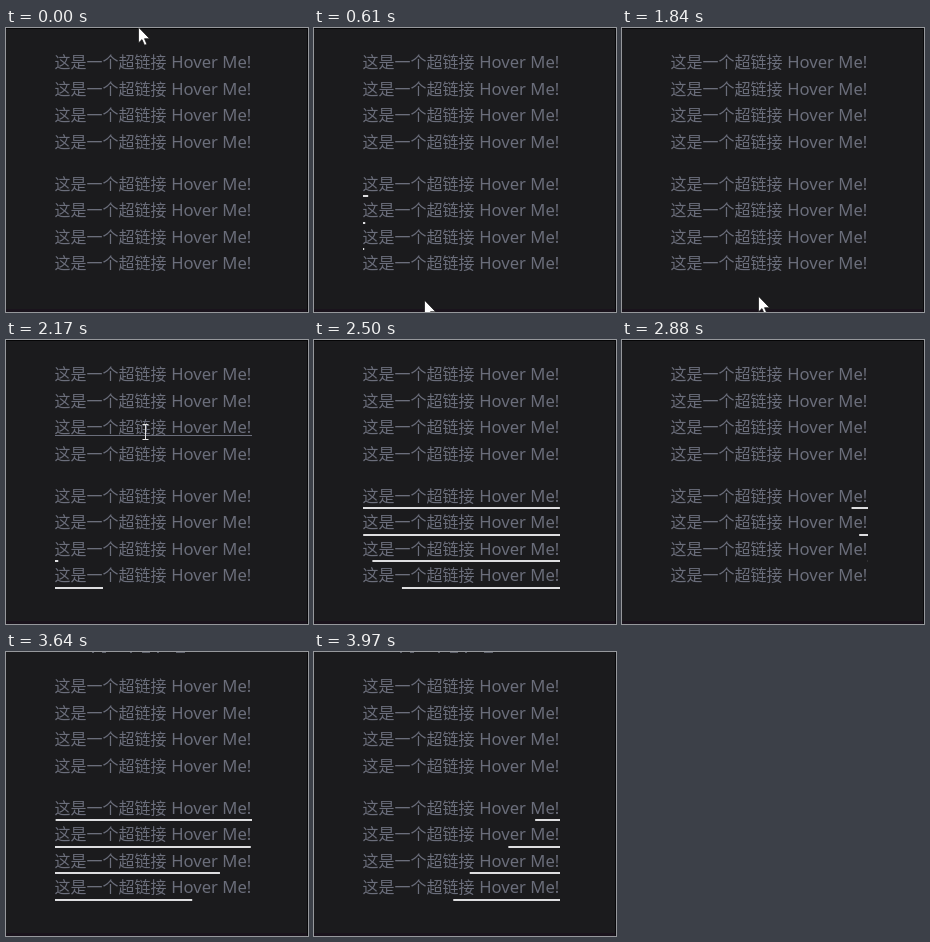
Write an HTML page that moves like this. It is 302 by 284 pixels and loops after 4020 ms.

```html
<!DOCTYPE html>
<html lang="zh-CN">
<head>
<meta charset="utf-8">
<title>Hover underline</title>
<style>
  html, body { margin: 0; width: 100%; height: 100%; overflow: hidden; background: #1b1b1d; }
  svg { display: block; width: 302px; height: 284px; }
  text { fill: #6b6e7b; }
  .zh { font: 16px "Noto Sans CJK SC", "Noto Sans CJK", sans-serif; }
  .en { font: 16.65px "Noto Sans", "Open Sans", sans-serif; }
</style>
</head>
<body>
<svg id="stage" viewBox="0 0 302 284">
  <rect width="302" height="284" fill="#1b1b1d"/>
  <rect id="edge" width="302" height="1" fill="#050506"/>
  <rect y="281" width="302" height="3" fill="#1a131c"/>
  <rect x="301" width="1" height="284" fill="#08080a"/>
  <path id="scrap" d="M86 .5h2M96 .5h4M124 .5h2M136 .5h8M151 .5h2M170 .5h9" stroke="#5c5f69" fill="none"/>
  <g id="links"></g>
  <path id="arrow" d="M-.5-.8V14.9L3 11.6L5.5 17.3L7.9 16.2L5.5 10.7H10.6Z" fill="#fff" stroke="#111" stroke-width=".7"/>
  <path id="beam" d="M-2.5-7.5H3.5M.5-7.5V7.5M-2.5 7.5H3.5" fill="none" stroke="#e4e4e4"/>
</svg>
<script>
const LOOP = 4020, LEFT = 49, RIGHT = 246, WIDTH = RIGHT - LEFT;
const GROW = 280, SHRINK = 450;
const $ = id => document.getElementById(id);

function add(tag, attrs, text) {
  const el = document.createElementNS("http://www.w3.org/2000/svg", tag);
  for (const k in attrs) el.setAttribute(k, attrs[k]);
  if (text) el.textContent = text;
  return $("links").appendChild(el);
}

const links = [];
for (let i = 0; i < 8; i++) {
  const lower = i > 3, n = i % 4;
  const base = Math.round((lower ? 161.6 : 40) + 26.6 * n);
  add("text", { x: 48.4, y: base + .4, class: "zh" }, "这是一个超链接");
  add("text", { x: 165.2, y: base, class: "en" }, "Hover Me!");
  const line = lower
    ? add("rect", { y: Math.round(166.9 + 26.7 * n), height: 2, fill: "#dedee0" })
    : add("rect", { x: LEFT, y: base + 2, width: WIDTH, height: 1, fill: "#6b6e7b" });
  links.push({ lower, line, mid: base - 5 });
}

// Each sweep: when the lower lines start to grow and to shrink, top to bottom
const sweeps = [
  { grow: [582, 592, 597, 612], shrink: [854, 872, 918, 945] },
  { grow: [2225, 2200, 2148, 2079], shrink: [2515, 2492, 2438, 2369] },
  { grow: [3297, 3375, 3435, 3465], shrink: [3625, 3675, 3734, 3758] }
];

// Pointer paths: time, x, y
const paths = [
  [[0, 133, 0], [50, 132, 4], [570, 114, 224], [610, 111, 272], [650, 110, 300]],
  [[1840, 137, 270], [2330, 140, 6], [2360, 140, -22]],
  [[2980, 150, -20], [3310, 145, 185], [3500, 142, 300]]
];

const ease = u => (1 - Math.cos(Math.PI * Math.min(1, Math.max(0, u)))) / 2;
const show = (el, on) => el.setAttribute("visibility", on ? "visible" : "hidden");

function pointer(t) {
  for (const p of paths)
    for (let i = 1; i < p.length; i++) {
      const [t0, x0, y0] = p[i - 1], [t1, x1, y1] = p[i];
      if (t >= t0 && t < t1) {
        const u = (t - t0) / (t1 - t0);
        return { x: x0 + (x1 - x0) * u, y: y0 + (y1 - y0) * u };
      }
    }
  return null;
}

function drawLine(rect, n, t) {
  let a = 0, b = 0;
  for (const s of sweeps)
    if (t >= s.grow[n] && t < s.shrink[n] + SHRINK) {
      b = WIDTH * ease((t - s.grow[n]) / GROW);
      a = WIDTH * ease((t - s.shrink[n]) / SHRINK);
    }
  rect.setAttribute("x", LEFT + a);
  rect.setAttribute("width", Math.max(0, b - a));
}

function render(t) {
  const p = pointer(t);
  const over = p && links.find(l => Math.abs(p.y - l.mid) < 10);
  links.forEach((l, i) => l.lower ? drawLine(l.line, i - 4, t) : show(l.line, l === over));
  show($("arrow"), p && !over);
  show($("beam"), over);
  if (p) {
    const move = `translate(${Math.round(p.x)} ${Math.round(p.y)})`;
    $("arrow").setAttribute("transform", move);
    $("beam").setAttribute("transform", move);
  }
  const scrolled = t >= 2980;
  show($("edge"), !scrolled);
  show($("scrap"), scrolled);
}

const start = performance.now();
function tick() {
  render((performance.now() - start) % LOOP);
  requestAnimationFrame(tick);
}
tick();
</script>
</body>
</html>
```
